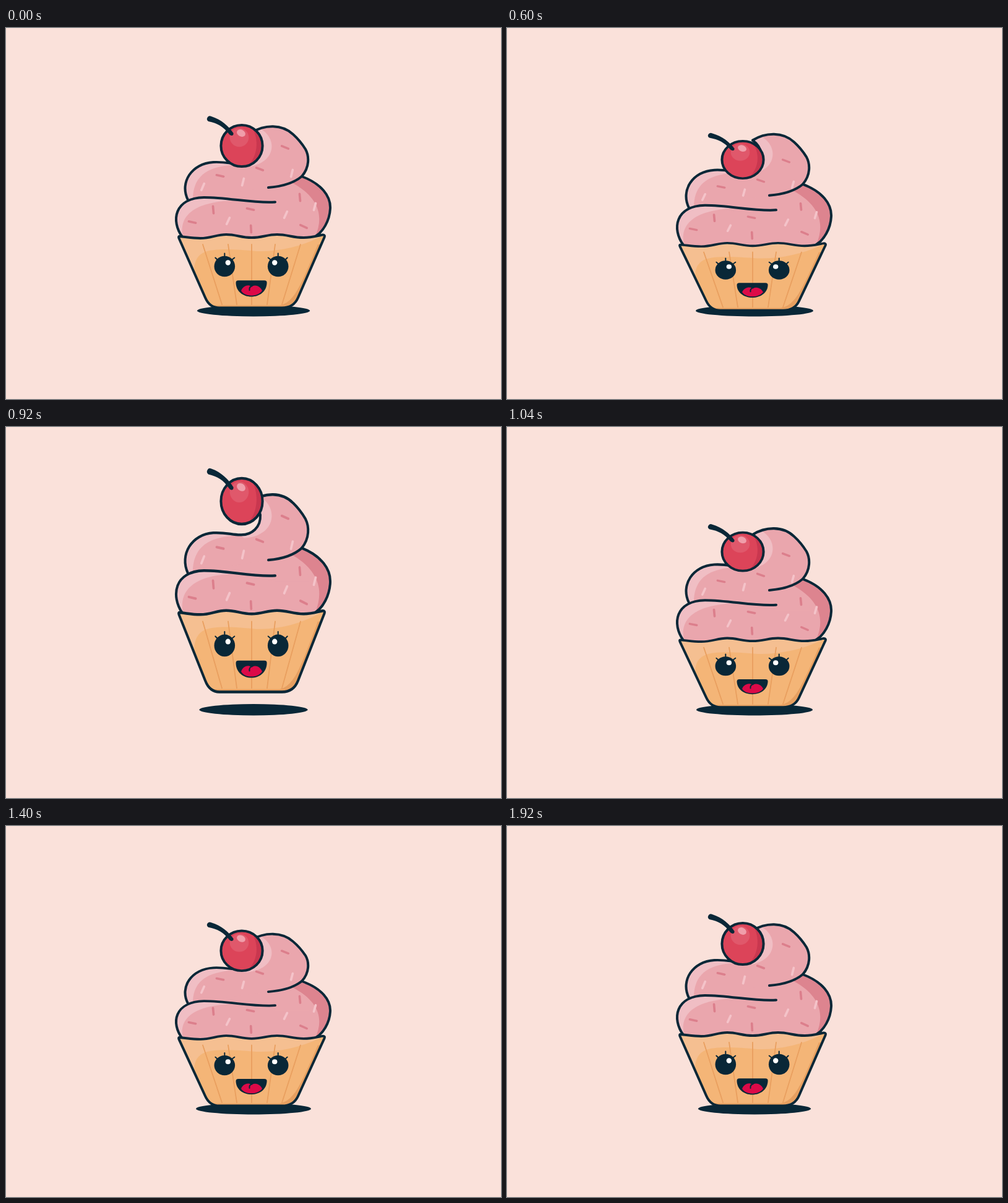
Recreate the animation shown at these times as an HTML page. Size 800 by 600 pixels, loop 2 s.

```html
<!DOCTYPE html>
<html lang="en">
<head>
<meta charset="utf-8">
<title>Jumping cupcake</title>
<style>
html, body { margin: 0; width: 100%; height: 100%; overflow: hidden; background: #fae1da; }
svg { display: block; width: 100%; height: 100%; }
.ink { fill: #092737; }
.line { fill: none; stroke: #092737; stroke-width: 4; stroke-linecap: round; stroke-linejoin: round; }
.pink { fill: #eaa6ad; }
.pale { fill: #f0bec4; }
.rose { fill: #dd848f; }
</style>
</head>
<body>
<svg viewBox="0 0 800 600">
  <defs>
    <path id="lobe" d="M285 338C266 312 272 275 320 274C360 274 400 284 435 281.5"/>
    <path id="swirl" d="M294 278C280 250 300 219 335 217C355 216 365 220 378 220C398 221 412 208 411 190C409 180 404 174 397 169C418 156 446 155 464 172C474 181 479 188 484 196C490 207 491 225 478 240C466 250 450 256 424 258"/>
    <path id="side" d="M478 240C510 252 525 272 524 292C523 312 512 330 500 337"/>
    <path id="cupShape" d="M280 337C292 338 300 340 314 340C332 340 340 334 356 334C372 334 380 339 397 339C414 339 422 334 438 334C455 334 463 339 481 339C495 339 503 336 512 334.5Q516 334.5 514.5 338.5L472 436Q465 452.500 446 452.500H345Q329 452.500 322 436L279.500 340Q278.500 337 280 337Z"/>
    <clipPath id="cupClip"><use href="#cupShape"/></clipPath>
  </defs>

  <ellipse id="shadow" class="ink" cx="400" cy="457.3" rx="91" ry="9.2"/>

  <g id="cream">
    <g class="pink">
      <path d="M285 340C266 312 272 275 320 274C360 274 400 284 435 281.5L478 240C510 252 525 272 524 292C523 312 512 330 500 340Z"/>
      <path d="M294 278L424 256L478 240L490 290L435 290Z"/>
      <use href="#swirl"/>
    </g>
    <path class="pale" d="M294 278C280 250 300 219 335 217C355 216 365 220 378 220C350 223 302 224 302 277Z"/>
    <path class="pale" d="M285 338C266 312 272 275 320 274C345 274 365 277 380 279C330 278 276 290 286 338Z"/>
    <path class="pale" d="M378 220C398 221 412 208 411 190C409 180 404 174 399 169Q407 163 413 164C440 181 436 222 385 225Z"/>
    <path class="rose" d="M462 250Q472 246 478 240C510 252 525 272 524 292C523 312 512 330 500 337C514 304 506 274 462 250Z"/>
    <g class="line">
      <use href="#side"/><use href="#swirl"/><use href="#lobe"/>
    </g>
  </g>

  <g id="sprinkles" stroke-width="3.7" stroke-linecap="round"></g>

  <g id="cup">
    <g clip-path="url(#cupClip)">
      <rect x="270" y="325" width="260" height="135" fill="#f4b577"/>
      <path fill="#f5bf91" d="M270 325H520L508 338C475 354 440 362 405 361C370 358 340 356 322 362Q304 369 304 392L270 345Z"/>
      <path fill="#e69f60" d="M504 350C486 394 473 424 464 434Q454 447 442 448.500H330V460H480L515 350Z"/>
      <path fill="none" stroke="#e99f5f" stroke-width="1.8" stroke-linecap="round" d="M318 350L349 447M359 350L373 447M397 350V447M435 350L422 447M476 350L446 447"/>
    </g>
    <use href="#cupShape" class="line"/>
  </g>

  <g id="face">
    <g id="eyes"></g>
    <path class="ink" d="M375.500 408.300H417.500Q422 408.300 421.600 412.500C421 426 410 434.500 396.500 434.500C383 434.500 372 426 371.500 412.500Q371.300 408.300 375.500 408.300Z"/>
    <path fill="#dc0a48" d="M380 425C383 416 394 414 397 419C401 414 411 417 414 425C409 431 403 432.700 397 432.700C390 432.700 384 431 380 425Z"/>
    <path class="line" style="stroke-width:2" d="M398 416.500Q392.500 419 393.500 424"/>
  </g>

  <g id="cherry">
    <circle cx="381" cy="190.5" r="33.6" fill="#dc4459"/>
    <path fill="#c9374f" d="M398 161A33.800 33.800 0 0 1 391 222.800C407 207 409 181 398 161Z"/>
    <circle cx="377" cy="177" r="15.3" fill="#e0586b"/>
    <ellipse cx="380" cy="170" rx="7.3" ry="5.4" fill="#f09eaa" transform="rotate(28 380 170)"/>
    <circle class="line" cx="381" cy="190.5" r="33.6"/>
    <path class="ink" d="M327 151Q323 148 326 144Q328 141 332 143C348 148 360 159 367.500 170Q368 174 364.500 174Q361.500 173.500 360 171C352 160 342 154 327 151Z"/>
  </g>
</svg>
<script>
const $ = id => document.getElementById(id);
const LOOP = 2000, STEP = 40;

// Sprinkles: x, y, angle
const dark = [[451, 193, 22], [410, 228, 20], [346, 239, 12], [301, 314, 12], [335, 294, 85],
  [395, 293, 12], [396, 325, 87], [475, 274, 85], [481, 321, 25]];
const light = [[318, 257, -67], [383, 249, -76], [462, 235, -76], [499, 289, -75],
  [452, 302, -65], [359, 312, -65]];
const sprinkle = color => ([x, y, a]) =>
  `<path d="M-5.700 0H5.700" stroke="${color}" transform="translate(${x} ${y}) rotate(${a})"/>`;
$('sprinkles').innerHTML =
  dark.map(sprinkle('#dc7f8c')).join('') + light.map(sprinkle('#f4c3c9')).join('');

const eye = (x, side) => `<g transform="translate(${x} 385.500) scale(${side} 1)">
  <circle class="ink" r="16.800"/><circle cx="5.500" cy="-6" r="4.200" fill="#fff"/>
  <path class="line" style="stroke-width:2" d="M0 -16V-21M-10 -9L-15 -14M11 -10L16 -14"/></g>`;
$('eyes').innerHTML = eye(353.3, 1) + eye(439.7, -1);

// Layer name and the two heights whose offsets a pose gives
const layers = [['cherry', 147, 225], ['cream', 159, 340], ['sprinkles', 193, 325],
  ['cup', 337, 453], ['face', 363, 434]];

// Pairs of offsets in layer order, then the change of shadow radius
const rest = Array(11).fill(0);
const dip = [7.6, 6.4, 3.5, 3, 5.5, 2.5, 3, 0.5, 2, 0.7, 1];
const squash = [27, 19, 12.5, 13, 22, 10.5, 13.5, 4, 8, 1.5, 4];
const stretch = [-75, -67, -50, -37, -47, -37, -37, -24, -33.5, -29, -3.5];
const land = [9.5, 8.7, 5, 1.5, 3, 1.2, 1.5, 0, 1, 0, 0.8];
const settle = [13, 10, 15.5, 5.5, 11, 4, 5, 0, 2.5, -0.5, 2];
const times = (pose, k) => pose.map(v => v * k);

const keys = [[200, rest], [440, dip], [600, squash], [640, times(squash, 1.03)],
  [840, times(stretch, 1.28)], [920, stretch], [1080, times(squash, 1.03)],
  [1200, land], [1400, settle], [1920, rest]];

// Monotone cubic between keys: level at turning points
function slope(i, n) {
  if (i === 0 || i === keys.length - 1) return 0;
  const rate = j => (keys[j + 1][1][n] - keys[j][1][n]) / (keys[j + 1][0] - keys[j][0]);
  const a = rate(i - 1), b = rate(i);
  return a * b > 0 ? 2 * a * b / (a + b) : 0;
}

function poseAt(t) {
  if (t <= keys[0][0] || t >= keys[keys.length - 1][0]) return rest;
  const i = keys.findIndex(k => k[0] > t) - 1;
  const [t0, p0] = keys[i], [t1, p1] = keys[i + 1];
  const h = t1 - t0, u = (t - t0) / h, s = u * u * (3 - 2 * u);
  return p0.map((v, n) => v + (p1[n] - v) * s
    + h * u * (1 - u) * ((1 - u) * slope(i, n) - u * slope(i + 1, n)));
}

function draw(t) {
  const pose = poseAt(t);
  layers.forEach(([id, top, bottom], i) => {
    const a = pose[2 * i], b = pose[2 * i + 1];
    const scale = 1 + (b - a) / (bottom - top);
    $(id).setAttribute('transform', `matrix(1 0 0 ${scale} 0 ${top + a - top * scale})`);
  });
  $('shadow').setAttribute('rx', 91 + pose[10]);
}

let start;
function tick(now) {
  start ??= now;
  draw(Math.floor((now - start) % LOOP / STEP) * STEP);
  requestAnimationFrame(tick);
}
draw(0);
requestAnimationFrame(tick);
</script>
</body>
</html>
```
